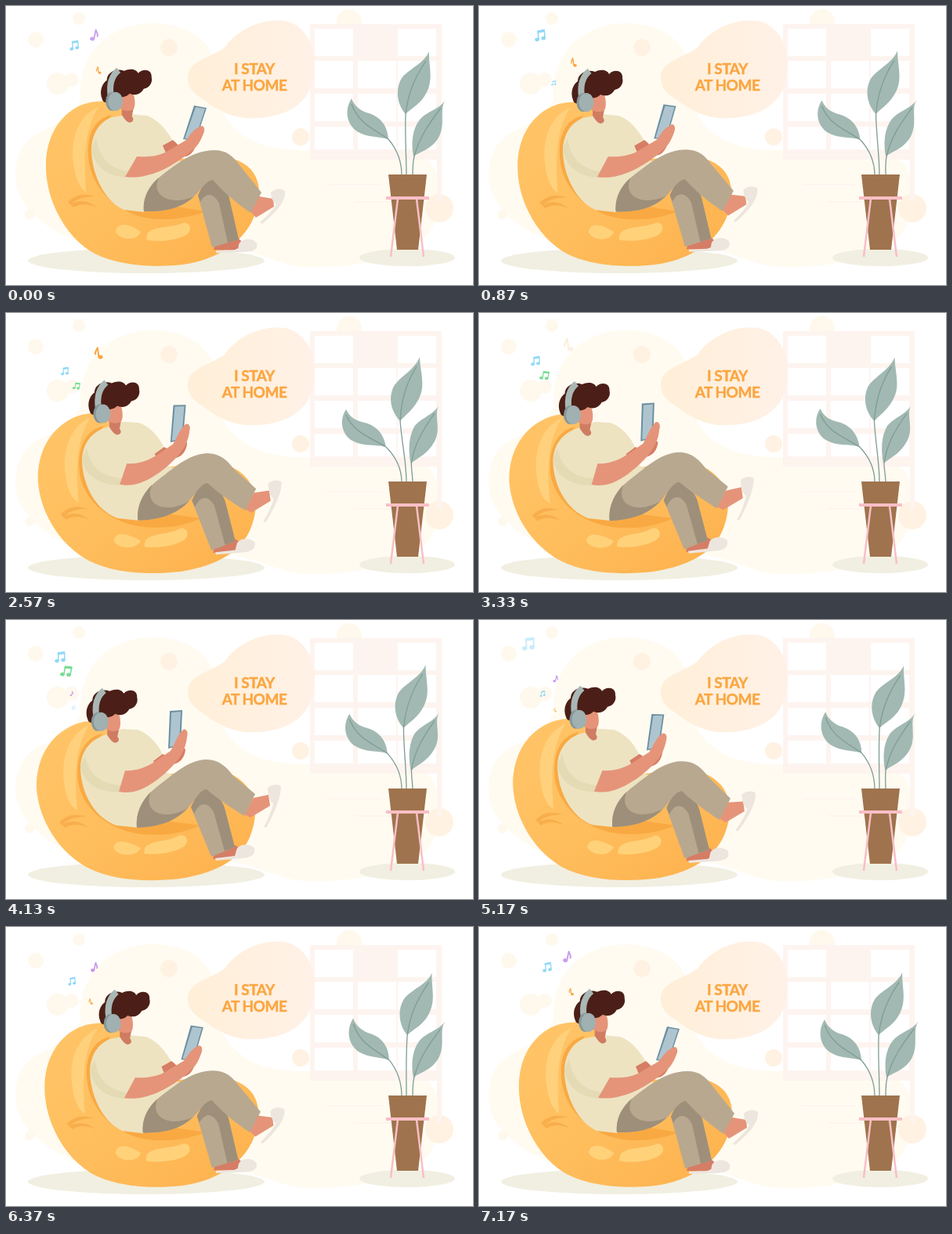
These frames come from a looping animation (596x356 px, 7.21 s). An HTML page:

```html
<!DOCTYPE html>
<html lang="en">
<head>
<meta charset="utf-8">
<title>I stay at home</title>
<style>
  html, body { margin: 0; width: 100%; height: 100%; overflow: hidden; background: #fff; }
  svg { display: block; width: 596px; height: 356px; }
  text { font: 700 19px Lato, Inter, sans-serif; letter-spacing: -.5px; fill: #fba640; stroke: #fba640; stroke-width: .45; text-anchor: middle; }
</style>
</head>
<body>
<svg viewBox="0 0 596 356">
  <defs>
    <linearGradient id="bagFill" x1="0" y1="0" x2="1" y2="1">
      <stop offset="0" stop-color="#ffc569"/><stop offset=".5" stop-color="#ffbe5d"/><stop offset="1" stop-color="#fdb04c"/>
    </linearGradient>
    <linearGradient id="bubbleFill" x1="0" x2="1">
      <stop offset="0" stop-color="#ffefd8"/><stop offset="1" stop-color="#fff1e7"/>
    </linearGradient>
  </defs>

  <path fill="#fffbf1" d="M15 195C28 150 70 165 95 120C92 60 130 22 190 22C250 24 275 60 270 110C276 160 318 184 380 184C420 184 450 195 520 190C560 190 560 260 540 290C500 330 420 335 380 333C340 330 300 300 260 310C190 330 110 315 60 285C20 260 5 230 15 195Z"/>
  <g id="dots"></g>
  <path fill="#fef4ef" d="M388 23H556V250H550V196H388Z"/>
  <g id="panes" fill="#fff"></g>
  <path fill="none" stroke="#fef5ef" stroke-width="2" d="M390 190H552M412 228H480M445 250H520"/>
  <path fill="url(#bubbleFill)" d="M232 92C232 70 258 68 279 53C297 28 330 14 360 20C392 30 400 72 390 100C380 135 340 145 305 143C280 140 262 127 250 118C240 112 232 104 232 92Z"/>
  <text x="317" y="87">I STAY</text>
  <text x="317" y="107.5">AT HOME</text>
  <ellipse cx="179" cy="325" rx="151" ry="16" fill="#f1efe1"/>
  <ellipse cx="512" cy="321" rx="61" ry="11" fill="#f1efe1"/>

  <g id="plant"></g>
  <path fill="#9f734d" d="M488 215H537L526 311H499Z"/>
  <path fill="none" stroke="#f9bfc6" stroke-width="2.5" d="M500 246L491 320M524 246L533 320"/>
  <path stroke="#f9bfc6" stroke-width="4" d="M485 245H540"/>

  <g id="person"></g>
  <g id="head">
    <path fill="#cf7c63" d="M147 128L162 130L160 140C163 144 162 147 157 148C153 147 150 143 147 138Z"/>
    <path fill="#e59479" d="M146 106L161 109C164 116 165 126 162 131C158 134 150 134 145 130Z"/>
    <path fill="#4b1f17" d="M140 118C134 122 124 126 122 118C118 108 122 98 128 94C128 84 140 78 150 82C158 78 166 80 168 85C174 78 186 80 185 90C187 97 182 104 175 105C170 114 162 113 157 111C152 117 146 114 140 118Z"/>
    <path fill="none" stroke="#a9b7b5" stroke-width="8" d="M143 81C134 88 131 100 133 114"/>
    <ellipse cx="135" cy="121" rx="8.5" ry="12" fill="#84979a"/>
    <ellipse cx="139" cy="121" rx="9.5" ry="12" fill="#a1b0b0"/>
  </g>
  <g id="notes"></g>
</svg>
<script>
const LOOP = 7210;
const $ = id => document.getElementById(id);

function add(parent, tag, attrs) {
  const el = document.createElementNS('http://www.w3.org/2000/svg', tag);
  for (const key in attrs) el.setAttribute(key, attrs[key]);
  return parent.appendChild(el);
}

// A path that blends between two poses with the same commands.
const morphing = (parent, attrs, from, to) =>
  ({ el: add(parent, 'path', attrs), from, to: to.match(/[\d.]+/g) });

function morph({ el, from, to }, p) {
  let i = 0;
  el.setAttribute('d', from.replace(/[\d.]+/g, n => (+n + (to[i++] - n) * p).toFixed(2)));
}

[[208, 53, 11], [376, 167, 11], [66, 99, 14], [84, 94, 9], [93, 16, 8], [30, 266, 6], [38, 43, 10], [553, 258, 18], [438, 20, 16]]
  .forEach(([cx, cy, r]) => add($('dots'), 'circle', { cx, cy, r, fill: r === 11 || r === 18 ? '#fff2e2' : '#fff8ed' }));

for (const [row, [y, height]] of [[29, 35], [70, 35], [112, 35], [154, 29]].entries())
  for (const [col, x] of [394, 449, 500].entries())
    if (row || col !== 1) add($('panes'), 'rect', { x, y, width: 49, height });

// Leaves: moment of the rightmost sway, then leaf and stem in both poses.
const leaves = [
  [6000,
    'M441 118C432 132 434 150 448 160C461 168 475 166 488 170C487 151 476 140 460 136C450 132 444 126 441 118Z',
    'M434 123C425 136 428 155 442 163C456 171 471 167 485 171C482 152 470 142 454 139C443 136 438 131 434 123Z',
    'M441 125C450 150 468 156 488 170C500 184 505 198 505 216',
    'M434 130C444 153 464 158 485 171C498 184 505 198 505 216'],
  [6000,
    'M540 58C539 75 546 92 537 110C529 126 516 131 510 138C498 124 497 105 505 92C514 80 533 74 540 58Z',
    'M528 56C528 73 536 92 527 109C519 125 508 131 503 138C490 124 488 107 495 93C504 80 521 73 528 56Z',
    'M536 70C521 92 513 112 510 138C509 165 511 190 511 216',
    'M524 68C510 90 504 112 503 138C505 165 511 190 511 216'],
  [6900,
    'M561 120C552 132 562 150 552 168C543 183 530 185 520 192C517 176 518 158 528 145C537 134 553 132 561 120Z',
    'M552 117C544 129 556 147 546 164C537 180 526 184 516 192C513 175 513 158 521 144C530 133 545 130 552 117Z',
    'M555 130C540 150 527 168 521 192C519 200 519 208 519 216',
    'M546 128C532 148 520 167 517 192C517 200 519 208 519 216']
].map(([peak, leafA, leafB, stemA, stemB]) => ({
  peak,
  shapes: [
    morphing($('plant'), { fill: '#a1b9b2' }, leafA, leafB),
    morphing($('plant'), { fill: 'none', stroke: '#7f9c95', 'stroke-width': 1.3 }, stemA, stemB)
  ]
}));

// Each part: fill, upright pose, leaned-back pose.
const PANTS = '#b8a890', PANTS_DARK = '#9e8f7a', SKIN = '#e59479', SKIN_DARK = '#d67d65', SHOE = '#ede6df';
const parts = [
  ['url(#bagFill)',
    'M152 126C130 119 104 119 84 133C60 150 50 178 51 208C52 245 72 290 108 313C140 332 190 334 225 330C270 324 306 300 318 265C326 245 325 222 312 208C300 196 285 192 265 192L150 200Z',
    'M140 134C122 127 100 126 80 137C52 152 38 182 39 215C42 255 66 295 104 316C140 334 185 334 222 330C268 323 302 305 313 272C320 252 321 230 307 212C295 198 280 191 260 190L140 205Z'],
  ['#ffd17c',
    'M118 129C92 140 82 170 86 200C88 220 94 232 102 238C100 200 98 160 118 129Z',
    'M106 134C80 146 70 176 74 207C76 226 82 238 91 243C88 206 86 166 106 134Z'],
  ['#f9a942',
    'M135 139C110 144 101 170 106 200C113 240 150 271 195 272C220 273 240 268 255 262L180 250C130 245 108 200 112 170Z',
    'M123 145C98 150 88 177 92 207C99 246 140 274 186 274C211 275 230 270 248 262L170 252C118 249 96 206 100 176Z'],
  ['#f8ae4c',
    'M79 250C92 238 102 240 115 243C102 243 92 245 84 252C97 246 107 250 116 257C104 252 95 252 86 257Z',
    'M68 258C81 246 91 248 104 251C91 251 81 253 73 260C86 254 96 258 105 265C93 260 84 260 75 265Z'],
  ['#ffd27a',
    'M140 288C142 275 156 277 172 288C168 300 146 300 140 288Z',
    'M137 291C139 279 153 281 172 291C166 303 143 302 137 291Z'],
  ['#ffd27a',
    'M180 291C188 280 208 284 226 277C235 275 239 286 230 292C215 301 186 301 179 298Z',
    'M177 291C185 280 205 284 221 275C230 272 235 283 227 289C212 299 183 300 176 298Z'],
  ['#ede3c1',
    'M135 142C118 148 109 165 109 185C110 215 125 248 150 260L176 263L240 205L215 195L213 172C206 160 195 145 180 140L160 138Z',
    'M123 148C107 154 95 168 95 190C96 218 110 250 140 262L168 265L232 205L205 195L200 172C195 160 184 146 168 140L148 139Z'],
  ['#e4daB4',
    'M109 182C112 202 126 216 152 219L156 211C134 208 119 196 115 168Z',
    'M95 186C98 206 113 219 144 220L147 211C122 209 106 199 101 173Z'],
  [SKIN_DARK,
    'M200 178L213 171C222 178 226 186 228 192C236 192 243 182 244 170L238 163C230 172 222 178 216 190L205 190Z',
    'M188 180L200 171C206 173 210 178 214 184C222 182 228 176 229 165L222 160C216 166 210 172 204 184L192 190Z'],
  ['#6c8fa0',
    'M240 127L256 130L242 172L226 170Z',
    'M209 116L225 115L223 160L207 164Z'],
  ['#aec5d0',
    'M242 129L254 131L241 171L228 169Z',
    'M211 118L223 117L221 159L209 162Z'],
  [SKIN,
    'M167 192C178 193 192 192 203 187L230 171C235 164 239 158 247 154C251 151 254 155 253 160C250 168 247 176 240 182C225 196 200 212 180 216C170 219 160 219 152 218Z',
    'M152 192C162 193 175 190 188 182L210 167C216 157 219 146 226 140C230 138 233 143 231 149C230 160 226 170 218 180C203 198 185 211 170 217C162 220 152 221 144 219Z'],
  [SKIN_DARK,
    'M268 300L297 297L306 305L290 312L265 311Z',
    'M266 298L292 287L303 294L290 303L264 305Z'],
  [SHOE,
    'M297 305C299 296 315 295 320 303C322 311 315 313 305 314L268 315L268 312L296 311Z',
    'M294 294C295 286 311 284 317 291C319 300 312 303 302 304L268 307L267 304L292 301Z'],
  [PANTS,
    'M245 242C250 230 256 220 266 220C280 230 284 240 286 250L297 298L263 308Z',
    'M236 239C242 226 248 214 258 214C272 224 278 234 280 244L292 290L262 302Z'],
  [PANTS_DARK,
    'M245 242C250 230 256 220 266 220C280 230 284 240 286 250L297 298L283 302L272 252C266 240 256 236 248 250Z',
    'M236 239C242 226 248 214 258 214C272 224 278 234 280 244L292 290L279 295L265 245C258 233 248 230 240 247Z'],
  [SKIN,
    'M311 261L323 243L341 246L342 256L319 270Z',
    'M304 248L316 227L335 223L337 237L312 252Z'],
  [SHOE,
    'M338 238C343 233 351 232 356 236C358 249 344 264 327 278L324 276C333 268 341 260 345 253C341 250 338 245 338 238Z',
    'M334 214C340 209 347 209 351 212C351 226 343 246 332 265L329 264C335 254 339 243 341 234C337 232 334 224 334 214Z'],
  [PANTS,
    'M176 262C174 245 185 226 200 215C220 200 240 184 266 184C282 184 290 192 298 203L326 238L312 264C295 252 280 240 264 222C256 222 248 235 240 243C225 257 205 263 176 262Z',
    'M167 265C165 247 175 227 190 215C210 200 232 178 256 178C272 178 282 188 290 199L318 222L304 250C285 238 270 228 256 216C248 216 240 231 232 240C217 256 197 264 167 265Z'],
  [PANTS_DARK,
    'M176 262C174 245 182 230 195 219C184 242 210 256 240 243C225 257 205 263 176 262Z',
    'M167 265C165 247 173 231 185 219C174 244 200 258 232 240C217 256 197 264 167 265Z']
].map(([fill, from, to]) => morphing($('person'), { fill }, from, to));

// Rising notes; keys are [time, x, y].
const BLUE = '#8fd8f8', PURPLE = '#c795ec', GREEN = '#78dd92', ORANGE = '#f9a640';
const notes = [
  { color: BLUE, pair: true, tilt: -6, keys: [[3900, 90, 116], [4130, 86, 112], [5170, 81, 94], [6370, 84, 69], [7210, 87, 50], [8840, 70, 26], [9300, 66, 20]] },
  { color: BLUE, pair: true, tilt: -2, keys: [[0, 108, 110], [1630, 84, 88], [2570, 75, 74], [4130, 69, 47], [5170, 63, 30], [5600, 60, 24]] },
  { color: PURPLE, tilt: 12, keys: [[3500, 84, 105], [4130, 84, 94], [5170, 98, 75], [6370, 113, 51], [7210, 113, 37], [8000, 111, 25]] },
  { color: GREEN, pair: true, tilt: 10, keys: [[1000, 106, 116], [1630, 99, 108], [2570, 90, 93], [4130, 77, 65], [5100, 70, 48]] },
  { color: ORANGE, flip: true, tilt: -8, keys: [[4800, 94, 121], [5170, 97, 115], [6370, 108, 95], [7210, 118, 82], [8840, 123, 63], [9780, 118, 51], [10700, 113, 38]] }
];
for (const note of notes) {
  note.el = add($('notes'), 'g', { fill: note.color, stroke: note.color });
  const draw = (d, width) => add(note.el, 'path', { d, fill: 'none', 'stroke-width': width });
  const bulb = (cx, cy) => add(note.el, 'ellipse', { cx, cy, rx: 3.3, ry: 2.7, stroke: 'none' });
  if (note.pair) {
    bulb(-5, 6); bulb(4.5, 5);
    draw('M-2.7 6V-6M6.8 5V-7', 1.8);
    draw('M-3.5 -5L7.6 -6.2', 3.8);
  } else {
    bulb(-2, 6);
    draw('M.3 6V-8C1 -4 6 -3 4 2', 2.2);
  }
}

function moveNote({ el, keys, tilt, flip }, now) {
  const start = keys[0][0], end = keys[keys.length - 1][0];
  const t = now < start ? now + LOOP : now;
  if (t >= end) return el.setAttribute('opacity', 0);
  const i = keys.findIndex(key => key[0] > t);
  const [t0, x0, y0] = keys[i - 1], [t1, x1, y1] = keys[i];
  const k = (t - t0) / (t1 - t0);
  const scale = .25 + .8 * (t - start) / (end - start);
  el.setAttribute('opacity', Math.min(1, (t - start) / 400, (end - t) / 900));
  el.setAttribute('transform',
    `translate(${x0 + (x1 - x0) * k} ${y0 + (y1 - y0) * k}) rotate(${tilt}) scale(${flip ? -scale : scale} ${scale})`);
}

const wave = (t, peak) => Math.cos((t - peak) / LOOP * 2 * Math.PI);

function render(t) {
  const lean = (1 - wave(t, 0)) / 1.9;
  parts.forEach(part => morph(part, lean));
  $('head').setAttribute('transform', `translate(${.7 - 18.5 * lean} ${.8 + 8 * lean})`);
  for (const { peak, shapes } of leaves) {
    const sway = (wave(0, peak) - wave(t, peak)) / (wave(0, peak) + 1);
    shapes.forEach(shape => morph(shape, sway));
  }
  notes.forEach(note => moveNote(note, t));
}

const begin = performance.now();
function tick() {
  render((performance.now() - begin) % LOOP);
  requestAnimationFrame(tick);
}
tick();
</script>
</body>
</html>
```
